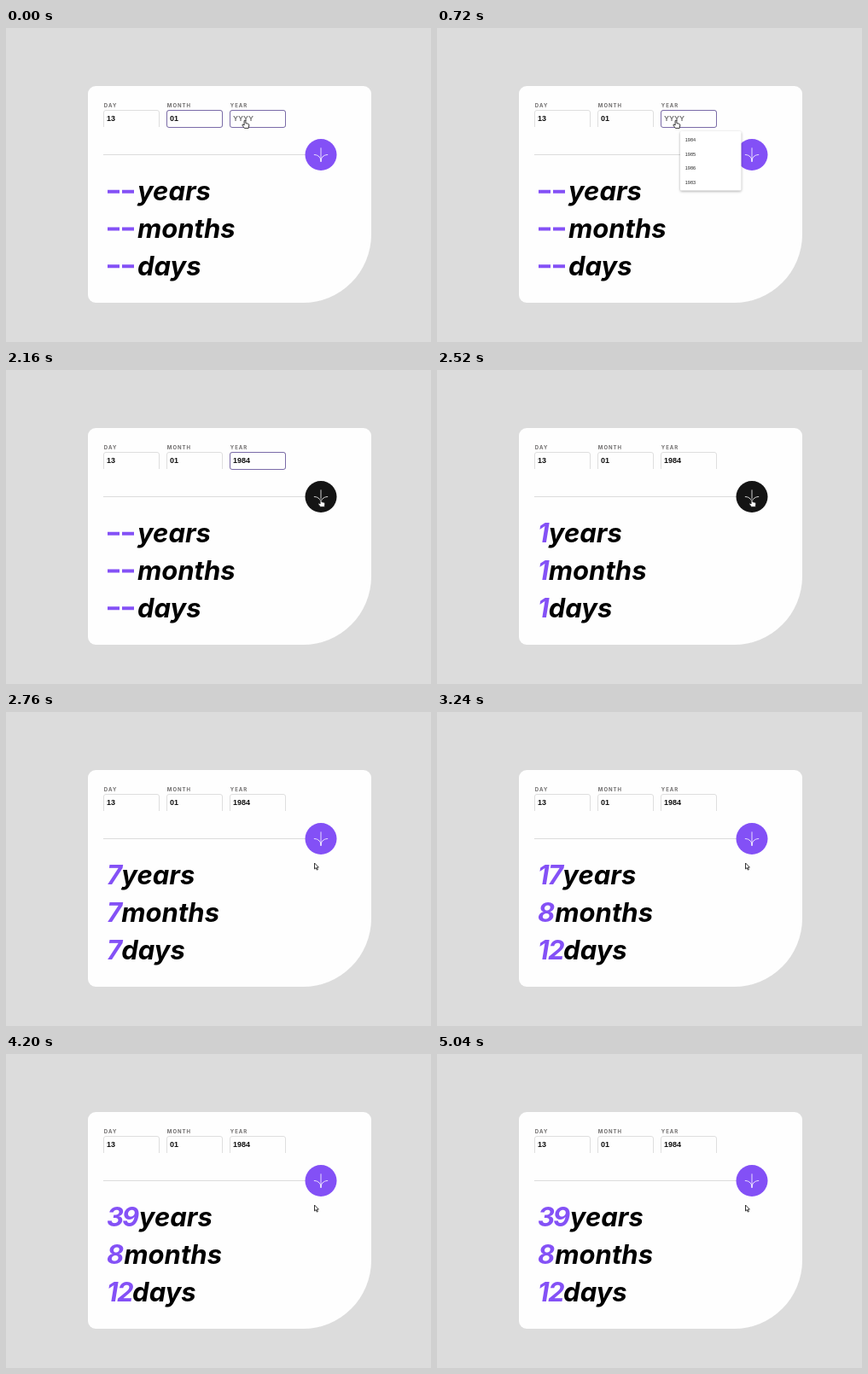
An HTML page for the animation above (5400 ms loop, 498x368 px).

```html
<!DOCTYPE html>
<html lang="en">
<head>
<meta charset="utf-8">
<title>Age calculator</title>
<style>
  html, body { margin: 0; width: 100%; height: 100%; overflow: hidden; background: #dcdcdc; }
  svg { display: block; width: 498px; height: 368px; }
  .label { font: 700 6px Inter, sans-serif; letter-spacing: 1px; fill: #716f6f; }
  .value { font: 700 9px "Liberation Sans", Arial, sans-serif; fill: #111; }
  .result { font: italic 700 31px Inter, sans-serif; font-feature-settings: "cv11"; }
  .option { font: 5.5px "Liberation Sans", Arial, sans-serif; fill: #222; }
  .digits { fill: #8451f6; }
  .dashes { stroke: #8451f6; stroke-width: 4; }
  .idle { fill: none; stroke: #dedede; }
  .focus { fill: none; stroke: #7a6ba8; }
  #popup rect { fill: #fff; filter: drop-shadow(0 1px 1.5px #0005); }
  #hand, #arrow { fill: #fff; stroke: #222; stroke-width: .9; stroke-linejoin: round; }
</style>
</head>
<body>
<svg viewBox="0 0 498 368">
  <path fill="#fefefe" d="M105 68H419a9 9 0 0 1 9 9V242a80 80 0 0 1-80 80H105a9 9 0 0 1-9-9V77a9 9 0 0 1 9-9Z"/>
  <g id="fields"></g>
  <path id="caret" d="M266.5 101v10" stroke="#111"/>
  <path d="M114 148.5H351" stroke="#dcdcdc"/>
  <circle id="button" cx="369" cy="148.5" r="18.5"/>
  <path transform="translate(360.5 140.4) scale(.37)" fill="none" stroke="#fff" stroke-width="2.2"
    d="M1 22C8.3 21.7 23 25.6 23 44V0M45 22C37.7 21.7 23 25.6 23 44"/>
  <g id="rows"></g>
  <g id="popup"><rect x="285" y="121" width="71.5" height="69.5" rx="1.5"/></g>
  <path id="hand" d="M-.9 .6Q0-.6 .9 .6V3.6L3.6 4.2Q5 4.6 4.8 6L4.2 9.4H-.6L-3 6.2Q-3.4 4.8-2 5L-.9 6Z"/>
  <path id="arrow" d="M0 0V7L1.6 5.5L2.8 8.1L3.9 7.6L2.8 5.1H4.9Z"/>
</svg>
<script>
const LOOP = 5400, STEP = 120;
const PURPLE = [131, 80, 246], BLACK = [20, 20, 20];
const $ = id => document.getElementById(id);
const clamp = x => Math.max(0, Math.min(1, x));
const show = (node, on) => node.style.display = on ? '' : 'none';

function add(parent, tag, attrs, text = '') {
  const node = document.createElementNS('http://www.w3.org/2000/svg', tag);
  for (const key in attrs) node.setAttribute(key, attrs[key]);
  node.textContent = text;
  return parent.appendChild(node);
}

const [day, month, year] = ['DAY', 'MONTH', 'YEAR'].map((name, i) => {
  const x = 114.5 + i * 74, group = $('fields');
  add(group, 'text', { class: 'label', x: x + .3, y: 93.4 }, name);
  add(group, 'path', { class: 'idle', d: `M${x} 116V99q0-2.5 2.5-2.5h60q2.5 0 2.5 2.5v17` });
  const focus = add(group, 'rect', { class: 'focus', x, y: 96.5, width: 65, height: 20, rx: 2.5 });
  const value = add(group, 'text', { class: 'value', x: x + 3.5, y: 109.2 }, ['13', '01', ''][i]);
  return { focus, value };
});
day.focus.style.opacity = 0;

[1984, 1985, 1986, 1983].forEach((n, i) =>
  add($('popup'), 'text', { class: 'option', x: 290.8, y: 133 + i * 16.5 }, n));

const rows = [['years', 39], ['months', 8], ['days', 12]].map(([unit, max], i) => {
  const y = 202 + i * 43.8;
  return {
    max,
    dashes: add($('rows'), 'path', { class: 'dashes', d: `M119 ${y - 10.3}h14m3 0h14` }),
    digits: add($('rows'), 'text', { class: 'result digits', y }),
    unit: add($('rows'), 'text', { class: 'result', y }, unit)
  };
});

// Advance of each digit 0–9
const ADVANCE = [20, 12, 17.3, 18, 19.5, 18.5, 19, 16.5, 19.5, 19];

function drawRow({ max, dashes, digits, unit }, count) {
  const text = count < 1 ? '' : String(Math.min(count, max));
  const xs = [];
  let x = 118;
  for (const c of text) {
    xs.push(x);
    x += ADVANCE[c];
  }
  show(dashes, !text);
  digits.textContent = text;
  digits.setAttribute('x', xs.join(' '));
  unit.setAttribute('x', text ? x + .8 : 154);
}

// time, x, y of the pointer tip
const PATH = [
  [0, 280, 108], [1440, 280, 108], [1560, 288.5, 104], [1680, 310, 118], [1800, 348, 138],
  [1920, 366, 149], [2160, 369, 151], [2520, 369, 151], [2640, 366, 165], [2760, 361.5, 177], [LOOP, 361.5, 177]
];

function pointerAt(t) {
  const i = PATH.findIndex(p => p[0] > t);
  const [t0, x0, y0] = PATH[i - 1], [t1, x1, y1] = PATH[i];
  const k = (t - t0) / (t1 - t0);
  return [x0 + (x1 - x0) * k, y0 + (y1 - y0) * k];
}

function draw(t) {
  const typed = [960, 1080, 1200, 1440].filter(key => t >= key).length;
  year.value.textContent = typed ? '1984'.slice(0, typed) : 'YYYY';
  year.value.style.fill = typed ? '' : '#777';
  month.focus.style.opacity = clamp(1 - t / 360);
  year.focus.style.opacity = clamp((2520 - t) / 120);
  show($('caret'), t >= 240 && t < 720);
  show($('popup'), t >= 240 && t < 1680);

  const hover = clamp((t - 1800) / 240) * clamp((2740 - t) / 200);
  $('button').style.fill = `rgb(${PURPLE.map((c, i) => c + (BLACK[i] - c) * hover)})`;

  const count = Math.floor((t - 2440) / 45);
  rows.forEach(row => drawRow(row, count));

  const [x, y] = pointerAt(t);
  const clickable = y < 117 || Math.hypot(x - 369, y - 148.5) < 18.5;
  for (const id of ['hand', 'arrow']) {
    $(id).setAttribute('transform', `translate(${x} ${y})`);
    show($(id), clickable === (id === 'hand'));
  }
}

function frame() {
  const t = performance.now() % LOOP;
  draw(t - t % STEP);
  requestAnimationFrame(frame);
}
frame();
</script>
</body>
</html>
```
